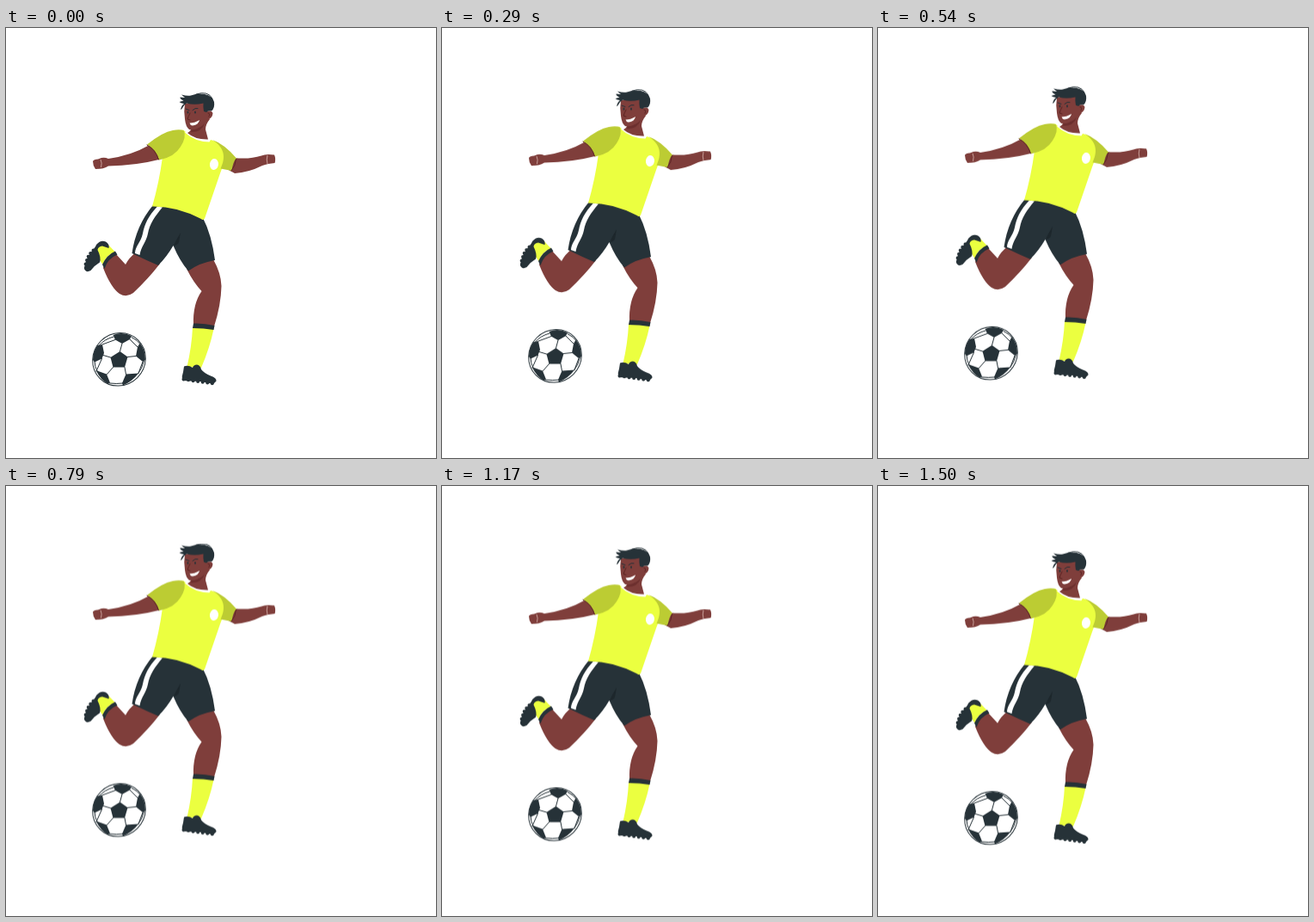
An HTML page for the animation above (1.54 s loop, 500 by 500 pixels).

```html
<!DOCTYPE html>
<html lang="en">
<head>
<meta charset="utf-8">
<title>Footballer</title>
<style>
  html, body { margin: 0; width: 100%; height: 100%; overflow: hidden; background: #fff; }
  svg { display: block; width: 100vw; height: 100vh; }
  .skin { fill: #7f3e3b; }
  .dark { fill: #263238; }
  .kit { fill: #ebff40; }
  .sleeve { fill: #bccc33; }
  .white { fill: #fff; }
  .line { fill: none; stroke: #263238; stroke-width: 1; stroke-linecap: round; stroke-linejoin: round; }
  .studs { fill: none; stroke: #263238; stroke-width: 4; stroke-linecap: round; }
  .crease { fill: none; stroke: #e8c9c2; stroke-width: .7; }
  .shade { fill: none; stroke: #5c2423; stroke-width: 1; stroke-linecap: round; }

  /* Linear bob, held at 24 pictures per second */
  .float { animation: bob 1540ms -5ms infinite; }
  @keyframes bob {
    0% { transform: translateY(0); animation-timing-function: steps(18, end); }
    48.648% { transform: translateY(-9.99px); animation-timing-function: step-end; }
    48.649% { transform: translateY(-9.04px); animation-timing-function: steps(19, end); }
    100% { transform: translateY(1.22px); }
  }
</style>
</head>
<body>
<svg viewBox="0 0 500 500">
  <g class="float">
    <g id="ball">
      <ellipse class="line" cx="131.500" cy="385.300" rx="31.500" ry="30.100" transform="rotate(-45 131.500 385.300)" style="fill:#fff"/>
      <path class="line" stroke-width=".8" d="M125 359Q114 362 108.500 369M146 359.500Q153 363 156.500 368M103 387Q103 394 106 399M160.500 387Q158.500 396 153.500 402M120 413Q128 414 137 413"/>
      <g class="dark">
        <path d="M132.500 376L141.500 382.500L138 394.500H124.500L121.500 383Z"/>
        <path d="M124.500 357Q135 352.500 146 358L144 362L135 367L127 362.500Z"/>
        <path d="M101 386Q101 376 106.500 369L112 368L114 378L111.500 384.500L103 388.500Z"/>
        <path d="M155.500 366.500Q162 373 162 386L159 388L151 381.500L153 371Z"/>
        <path d="M104.500 398L117 402.500L121 412.500L118.500 414Q110 409 104.500 398Z"/>
        <path d="M139.500 402.500L154 401.500Q147 411 136 415.500L135 413Z"/>
      </g>
      <path class="line" d="M132.500 376L135 367M141.500 382.500L151 381.500M138 394.500L139.500 402.500M124.500 394.500L117.500 402.500M121.500 383L113 380.500M127 362.500L112 368M144 362L153 371M111.500 384.500L105 399M159 388L154 401.500"/>
    </g>

    <g id="back-leg">
      <path class="skin" d="M151 261Q143 267 139 275L128 263Q117 268 113 279Q122 302 132 309Q140 314 148 308Q166 291 179 274Z"/>
      <path class="kit" d="M106 256Q110 251 118 251L127 260.500Q116 264 112.500 275Q106 267 106 256Z"/>
      <path class="dark" d="M112 275Q117 264 127 259.500L129.500 263.500Q118 268 114.500 280Z"/>
      <path class="dark" d="M105 252Q110 246 116 248.500Q120.500 251 119.500 256L112 253.500Q107 254 106.500 258Q111 267 109 272.500Q103 276 98.500 282Q93 285 91 280Q92 270 98.500 261Q104 255 105 252Z"/>
      <path class="studs" stroke-dasharray="0 4.6" d="M101.500 258.500Q95.500 264 94 270Q91 276 94 281.500"/>
    </g>

    <g id="front-leg">
      <path class="skin" d="M210 280Q226 270 241 269Q250 285 250.500 300Q250 322 242 347L218 345Q217 321 227.500 306Q218 296 210 280Z"/>
      <path class="kit" d="M217 348Q230 348 241.500 350Q237 372 227 395L210.500 394Q216 370 217 348Z"/>
      <path class="dark" d="M218 343.500Q230 343 242.500 346L241.500 351Q230 349 217 349Z"/>
      <path class="dark" d="M207 393.500Q212 391.500 217 395Q218 391.500 222 391.500Q226 392 227 397Q231 402 238 404.500Q245 407 244.500 410.500L241 414Q232 412 225 411L205 410Q204 405 206 400Z"/>
      <path class="studs" stroke-dasharray="0 5.600" d="M206.500 408.500L213 409.500L241.500 413.500"/>
    </g>

    <path class="dark" d="M171 206Q201 205 229 221Q239 240 243 270Q225 273 212 282.500Q202 271 194.500 253Q187 266 177 276Q163 270 146.500 262Q151 230 171 206Z"/>
    <path fill="#1d272c" d="M203 238Q198 246 195 253Q200 252 201 249Z"/>
    <path class="white" d="M176 207.500C166 218 161 228 159 239C157 249 150 254 150 262L155.500 264C157 254 163 249 165 239C167 228 173 219 182 208.500Z"/>

    <g id="arms">
      <path class="skin" d="M101 155Q102 152.500 107 152.500L111 151Q115 150 119 152Q146 148 165 137L180 140V152.500Q151 160 119 160.500Q114 164 104 164Q101 160 101 155Z"/>
      <path class="crease" d="M110 153Q112 157 110.500 162"/>
      <path class="skin" d="M265 151Q283 153 297 148.500Q302 146 312 147.500Q314 152 312.500 157L305 158Q301 159 298 160Q282 168 266 169L257 164Z"/>
      <path class="crease" d="M304 148Q302.500 153 304 158"/>
    </g>

    <path class="kit" d="M206 118.500Q222 133 238 130Q249 133 253 141Q255 156 249 169L231 221.500Q229 224 227 222Q198 207 170 207.500Q178 180 182 150L190 122Z"/>
    <path class="sleeve" d="M164 135.500Q182 121 194 119Q203 117.500 207 119.500Q210 127 203 138Q196 150 178 153.500Q175 142 164 135.500Z"/>
    <path class="shade" stroke-width="1.300" d="M164 136Q174 141 177.500 153"/>
    <path class="sleeve" d="M240 130Q254 135 268 151.500Q264 155 262.500 166L249.500 163.500C256 150 254 139 240 130Z"/>
    <path class="shade" d="M267.500 152.500Q267 160 262 166"/>
    <ellipse class="white" cx="242" cy="158.500" rx="5" ry="6.500" transform="rotate(8 242 158)"/>

    <g id="head">
      <path class="white" d="M210.500 119.500L208 121.500Q220 132.500 236.500 132.500L238 130L233 127Z"/>
      <path class="skin" d="M216 114Q216 119 211 122Q220 130 235 129.500L232 118Q232 112 237 106L225 104Z"/>
      <path fill="#6c2f2e" d="M216 117Q225 118 231 111Q228 121 215 121Z"/>
      <path class="skin" d="M208 88Q206.500 97 208 106Q209 115 213 118Q221 120 230 111L234 107Q240 105 240.500 99Q239 95 234 97L230 84Z"/>
      <path class="dark" d="M203 95Q204 90 207 88Q203 87.500 201.500 86L206.500 84.500Q202 82.500 202.500 80.500L208 81L204 77.500Q211 79.500 215 78.500Q223 75.500 231 77Q240 79 242 86Q243 93 239 96.500Q235 95.500 233 98L230 97Q229 92 229.500 87.500Q219 90 210 87.500Q206 90 204.500 94Z"/>
      <path class="line" d="M221 77Q235 72.500 240 82"/>
      <path class="line" d="M209 94L213 95.500M217 95.500Q220 92.500 223 93.500"/>
      <ellipse class="dark" cx="211.500" cy="98" rx=".9" ry="1.500"/>
      <ellipse class="dark" cx="220" cy="98" rx=".9" ry="1.500"/>
      <path class="shade" d="M214 99Q212 103 211 106L214 107M235 99Q238 99 236 103"/>
      <path class="white" d="M213.500 110.500Q219 110.500 225 107Q224 112.500 217 113.500Q214 113 213.500 110.500Z"/>
    </g>
  </g>
</svg>
</body>
</html>
```
